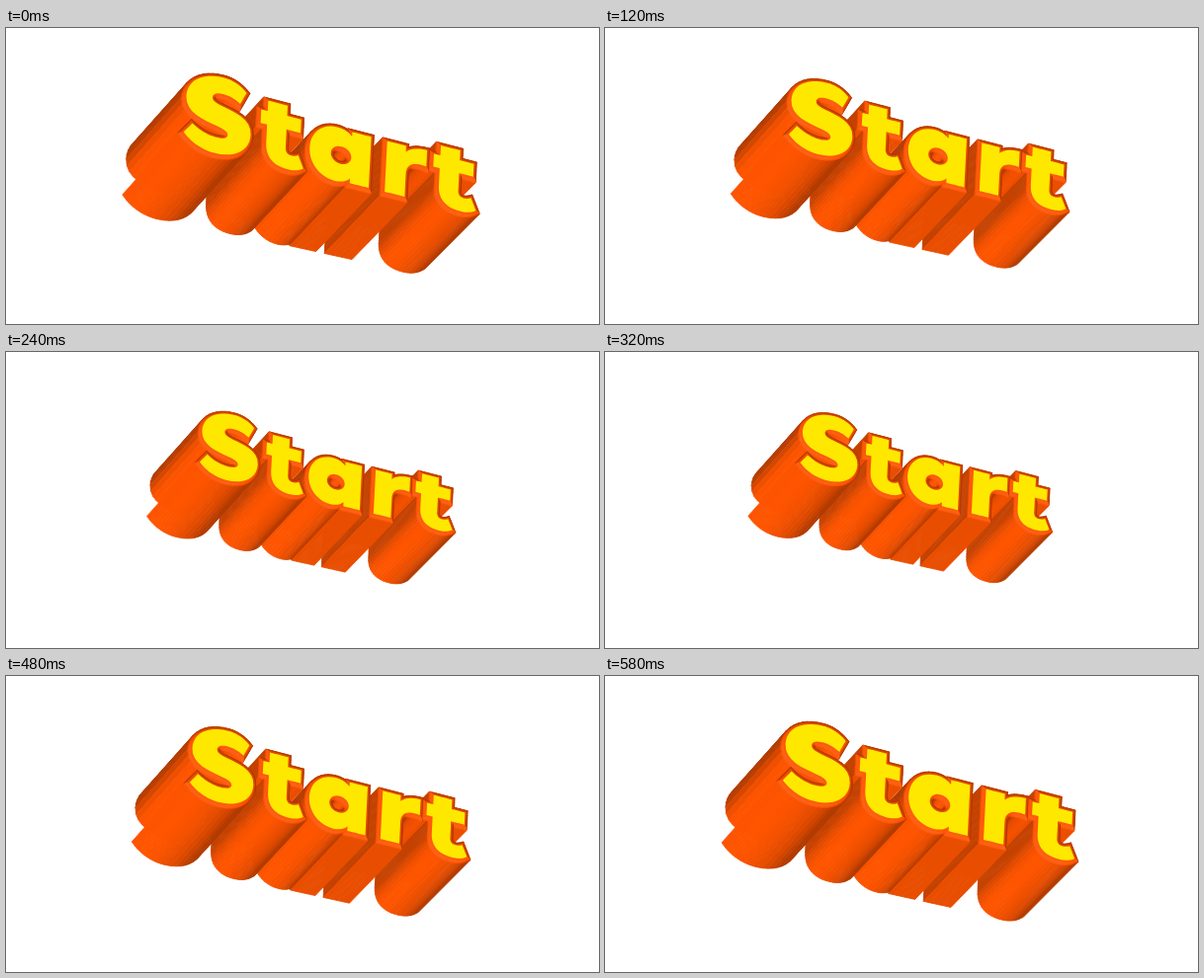
Animation of 600 by 300 pixels, one loop 600 ms. Source, as an HTML page with a canvas:

```html
<!DOCTYPE html>
<html lang="en">
<head>
<meta charset="utf-8">
<title>Start</title>
<style>
  html, body { margin: 0; width: 100%; height: 100%; overflow: hidden; background: #fff; }
  canvas { display: block; }
</style>
</head>
<body>
<canvas id="stage" width="600" height="300" role="img" aria-label="Start"></canvas>
<script>
const ctx = document.getElementById('stage').getContext('2d');
const LOOP = 600, STEP = 20, SHRINK = 0.15;
const BEVEL = 3.8, BEVEL_DEPTH = 2, RINGS = 4;
const LIGHT = [-0.68, 0.73];

// Letter outlines in font units, y up; the first contour is the outer one.
const GLYPHS = {
  S: 'M286 -26 C180 -26 74 24 10 106 L82 212 C137 166 216 132 288 132 C361 132 388 152 388 184 ' +
     'C388 282 18 211 18 462 C18 608 140 732 335 732 C412 732 480 700 532 642 L482 518 ' +
     'C435 552 390 570 338 570 C267 570 243 544 243 510 C243 412 585 482 585 239 C585 98 480 -26 286 -26',
  t: 'M80 622 L248 622 L248 518 L370 518 L370 382 L248 382 L248 200 C248 155 267 134 300 134 ' +
     'C322 134 342 141 360 154 L408 34 C375 4 330 -12 278 -12 C150 -12 80 60 80 198 L80 382 L24 382 L24 518 L80 518',
  a: 'M550 0 L550 525 L386 525 L386 478 C355 516 312 535 258 535 C130 535 28 422 28 262 ' +
     'C28 103 130 -12 258 -12 C312 -12 355 10 386 48 L386 0' +
     ' M388 262 C388 311 349 350 300 350 C251 350 212 311 212 262 C212 213 251 174 300 174 C349 174 388 213 388 262',
  r: 'M55 0 L228 0 L228 236 C228 328 276 368 348 368 C368 368 382 367 400 364 L400 535 ' +
     'C318 535 258 510 219 462 L219 525 L55 525'
};
const WORD = [['S', 0], ['t', 640], ['a', 1065], ['r', 1698], ['t', 2133]];

// Font units to the tilted plane, with a touch of perspective.
const project = (x, y) => [
  178 + 0.117 * x + 0.005 * y,
  116 + 0.0285 * x - (0.1035 - 3.1e-6 * x) * y
];
const depthAt = x => [-55.5, 62 - 0.022 * (x - 200)];

function flatten(outline, dx) {
  const pts = [];
  let x0, y0;
  for (const [, cmd, args] of outline.matchAll(/([MLC])([^MLC]+)/g)) {
    const n = args.trim().split(/\s+/).map(Number);
    if (cmd === 'M') pts.push([n[0], n[1]]);
    if (cmd === 'L') addLine(x0, y0, n[0], n[1]);
    if (cmd === 'C') {
      for (let i = 1; i <= 12; i++) {
        const t = i / 12, u = 1 - t;
        const mix = (p, k) => u * u * u * p + 3 * u * u * t * n[k] + 3 * u * t * t * n[k + 2] + t * t * t * n[k + 4];
        pts.push([mix(x0, 0), mix(y0, 1)]);
      }
    }
    [x0, y0] = n.slice(-2);
  }
  // Curved contours already end on their first point.
  if (Math.hypot(x0 - pts[0][0], y0 - pts[0][1]) > 1) addLine(x0, y0, ...pts[0]);
  function addLine(ax, ay, bx, by) {
    const count = Math.ceil(Math.hypot(bx - ax, by - ay) / 25);
    for (let i = 1; i <= count; i++) pts.push([ax + (bx - ax) * i / count, ay + (by - ay) * i / count]);
  }
  pts.pop();
  return pts.map(([x, y]) => project(x + dx, y));
}

function orient(pts, sign) {
  const area = pts.reduce((sum, p, i) => {
    const q = pts[(i + 1) % pts.length];
    return sum + p[0] * q[1] - q[0] * p[1];
  }, 0);
  return area * sign < 0 ? pts.reverse() : pts;
}

function contour(outline, dx, sign) {
  const pts = orient(flatten(outline, dx), sign), len = pts.length;
  const normals = pts.map((p, i) => {
    const q = pts[(i + 1) % len], l = Math.hypot(q[0] - p[0], q[1] - p[1]) || 1;
    return [(q[1] - p[1]) / l, (p[0] - q[0]) / l];
  });
  const ring = k => {
    const a = k / RINGS * Math.PI / 2;
    const grow = BEVEL * Math.sin(a), back = BEVEL_DEPTH * (1 - Math.cos(a));
    return pts.map((p, i) => {
      const m = normals[(i + len - 1) % len], n = normals[i];
      const s = grow / Math.max(0.5, 1 + m[0] * n[0] + m[1] * n[1]);
      return [p[0] + (m[0] + n[0]) * s + LIGHT[0] * back, p[1] + (m[1] + n[1]) * s + LIGHT[1] * back];
    });
  };
  return { normals, rings: Array.from({ length: RINGS + 1 }, (_, k) => ring(k)) };
}

function shade(n, tilt) {
  const dot = (n[0] * LIGHT[0] + n[1] * LIGHT[1]) * Math.cos(tilt) + Math.sin(tilt);
  const b = Math.min(1.18, Math.max(0.7, 0.35 + 0.65 * dot));
  return `rgb(${Math.round(255 * Math.min(1, b))},${Math.round(85 * b)},${Math.round(140 * Math.max(0, b - 1))})`;
}

const letters = WORD.map(([ch, dx]) =>
  GLYPHS[ch].split(/ (?=M)/).map((outline, i) => contour(outline, dx, i ? -1 : 1)));

const trace = (path, pts) => {
  pts.forEach((p, i) => i ? path.lineTo(p[0], p[1]) : path.moveTo(p[0], p[1]));
  path.closePath();
};
const shape = lists => {
  const path = new Path2D();
  lists.forEach(pts => trace(path, pts));
  return path;
};

// Side walls, sorted so that the ones nearest the face come last.
const walls = [];
for (const { normals, rings } of letters.flat()) {
  const edge = rings[RINGS];
  edge.forEach((p, i) => {
    const q = edge[(i + 1) % edge.length], d = depthAt(p[0]), e = depthAt(q[0]), n = normals[i];
    if (n[0] * d[0] + n[1] * d[1] <= 0) return;
    walls.push({
      key: (p[0] + q[0]) * LIGHT[0] + (p[1] + q[1]) * LIGHT[1],
      fill: shade(n, 0),
      path: shape([[p, q, [q[0] + e[0], q[1] + e[1]], [p[0] + d[0], p[1] + d[1]]]])
    });
  });
}
walls.sort((a, b) => a.key - b.key);

const bevels = [];
for (let k = RINGS; k > 0; k--) {
  const tilt = (1 - (k - 0.5) / RINGS) * Math.PI / 2;
  for (const { normals, rings } of letters.flat()) {
    const outer = rings[k], inner = rings[k - 1];
    outer.forEach((p, i) => {
      const j = (i + 1) % outer.length;
      bevels.push({ fill: shade(normals[i], tilt), path: shape([[p, outer[j], inner[j], inner[i]]]) });
    });
  }
}
const caps = shape(letters.flat().map(c => c.rings[RINGS]));
const faces = shape(letters.flat().map(c => c.rings[0]));

function paint(list) {
  for (const { fill, path } of list) {
    ctx.fillStyle = ctx.strokeStyle = fill;
    ctx.fill(path);
    ctx.stroke(path);
  }
}

function draw(time) {
  const t = Math.floor(time % LOOP / STEP) * STEP;
  const scale = 1 - SHRINK * (1 - Math.cos(2 * Math.PI * t / LOOP)) / 2;
  ctx.setTransform(1, 0, 0, 1, 0, 0);
  ctx.fillStyle = '#fff';
  ctx.fillRect(0, 0, 600, 300);
  ctx.setTransform(scale, 0, 0, scale, 300 - 300 * scale, 150 - 150 * scale);
  ctx.lineJoin = 'round';
  ctx.lineWidth = 0.9;
  paint(walls);
  ctx.fillStyle = '#e64c00';
  ctx.fill(caps);
  ctx.lineWidth = 0.4;
  paint(bevels);
  ctx.fillStyle = '#ffe800';
  ctx.fill(faces);
}

function tick() {
  draw(performance.now());
  requestAnimationFrame(tick);
}
tick();
</script>
</body>
</html>
```
